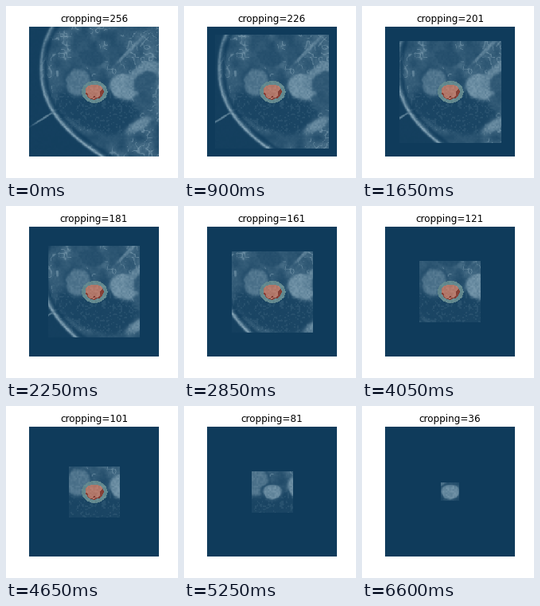
These frames come from a looping animation (216 by 216 pixels, 6.75 s). A matplotlib script:

```python
import numpy as np
import matplotlib.pyplot as plt
from matplotlib.animation import FuncAnimation

N = 256
FRAMES, STEP, INTERVAL = 45, 5, 150
SIDE, DPI = 216, 72
LEFT, TOP, SIZE = 29, 26, 163
NAVY, PALE, RING, POOL, SPOT = (
    np.array([int(h[i:i + 2], 16) for i in (0, 2, 4)]) / 255
    for h in ("0f3b5b", "bad4e0", "648a90", "b47a6c", "843f36"))
HEART = (111.2, 107.8)

rng = np.random.default_rng(7)
ticks = (np.arange(N) + 0.5) * SIZE / N
X, Y = np.meshgrid(LEFT + ticks, TOP + ticks)


def noise(cells):
    """Smooth random field in -1..1."""
    grid = rng.uniform(-1, 1, (cells + 1, cells + 1))
    t = np.linspace(0, cells, N)
    w = np.clip(1 - np.abs(t[:, None] - np.arange(cells + 1)), 0, 1)
    w = w * w * (3 - 2 * w)
    return w @ grid @ w.T


COARSE, MID, FINE = noise(14), noise(32), noise(80)


def step(d, soft=1.0):
    return 0.5 + 0.5 * np.tanh(d / soft)


def radius(center, rx, ry, deg=0):
    a = np.radians(deg)
    dx, dy = X - center[0], Y - center[1]
    return np.hypot((dx * np.cos(a) + dy * np.sin(a)) / rx,
                    (dy * np.cos(a) - dx * np.sin(a)) / ry)


def blob(img, value, center, rx, ry, deg=0, soft=0.1):
    r = radius(center, rx, ry, deg) + 0.08 * MID
    return img + (value - img) * step(1 - r, soft)


def make_scan():
    # soft tissue with bright fibres between darker lumps
    s = 0.22 + 0.11 * COARSE + 0.22 * np.exp(-(MID / 0.12) ** 2) * (COARSE > 0)
    s = blob(s, 0.14, (108, 65), 17, 10, 15)
    s = blob(s, 0.46, (157, 54), 25, 2, -45, 0.4)
    # lung, with fat at its lower right
    s = blob(s, 0.07 + 0.06 * (FINE > 0.45), (115, 131), 54, 27, 15)
    s = blob(s, 0.50, (167, 149), 17, 6, -30, 0.3)
    # liver around a dark oval
    s = blob(s, 0.53, (149, 101), 19, 16, 15)
    s = blob(s, 0.48, (173, 88), 25, 14, -35)
    s = blob(s, 0.20, (175, 95), 17, 11, -38)
    # both ventricles, each bright inside a dark wall
    for center, rx, ry, value in (((91, 96), 15, 17, 0.38),
                                  (HEART, 11.5, 9, 0.52)):
        s = blob(s, 0.13, center, rx + 3, ry + 3)
        s = blob(s, value, center, rx, ry)
    # skin follows a power curve; outside it is air
    drop = np.abs(Y - 78)
    slope = 0.0035 * drop ** 1.3
    depth = (X - 44 - 0.00152 * drop ** 2.3) / np.hypot(1, slope)
    s *= 1 - 0.7 * np.exp(-((depth - 6) / 3) ** 2)
    s = 0.03 + (s - 0.03) * step(depth)
    s += (0.62 - s) * np.exp(-(depth / 1.9) ** 2) * (0.55 + 0.45 * step(Y - 95, 25))
    # fold of the arm
    s = blob(s, 0.42, (47, 141), 15, 1.2, -32, 0.4)
    return np.clip(s * (1 + 0.15 * FINE), 0, 1)


def paint_labels(rgb):
    out = rgb.copy()
    ring = radius(HEART, 16.2, 13.8) < 1
    r = radius(HEART, 11.6, 9.4) + 0.06 * MID
    pool = r < 1
    spots = pool & (r + 0.35 * MID + 0.025 * (Y - HEART[1]) > 0.93)
    for mask, color in ((ring, RING), (pool, POOL), (spots, SPOT)):
        out[mask] = color + 0.03 * FINE[mask, None]
    return out


plain = NAVY + make_scan()[..., None] * (PALE - NAVY)
labelled = paint_labels(plain)

fig = plt.figure(figsize=(SIDE / DPI, SIDE / DPI), dpi=DPI, facecolor="white")
ax = fig.add_axes([LEFT / SIDE, 1 - (TOP + SIZE) / SIDE,
                   SIZE / SIDE, SIZE / SIDE])
ax.axis("off")
view = ax.imshow(plain, aspect="auto", interpolation="nearest")
title = ax.set_title("", fontsize=12, pad=6)


def update(i):
    size = N - STEP * i
    lo = N // 2 - size // 2
    box = slice(lo, lo + size)
    frame = np.tile(NAVY, (N, N, 1))
    frame[box, box] = (labelled if size > 90 else plain)[box, box]
    view.set_data(frame)
    title.set_text(f"cropping={size}")
    return view, title


anim = FuncAnimation(fig, update, frames=FRAMES, interval=INTERVAL,
                     repeat=True, repeat_delay=0, blit=False)
plt.show()
```
